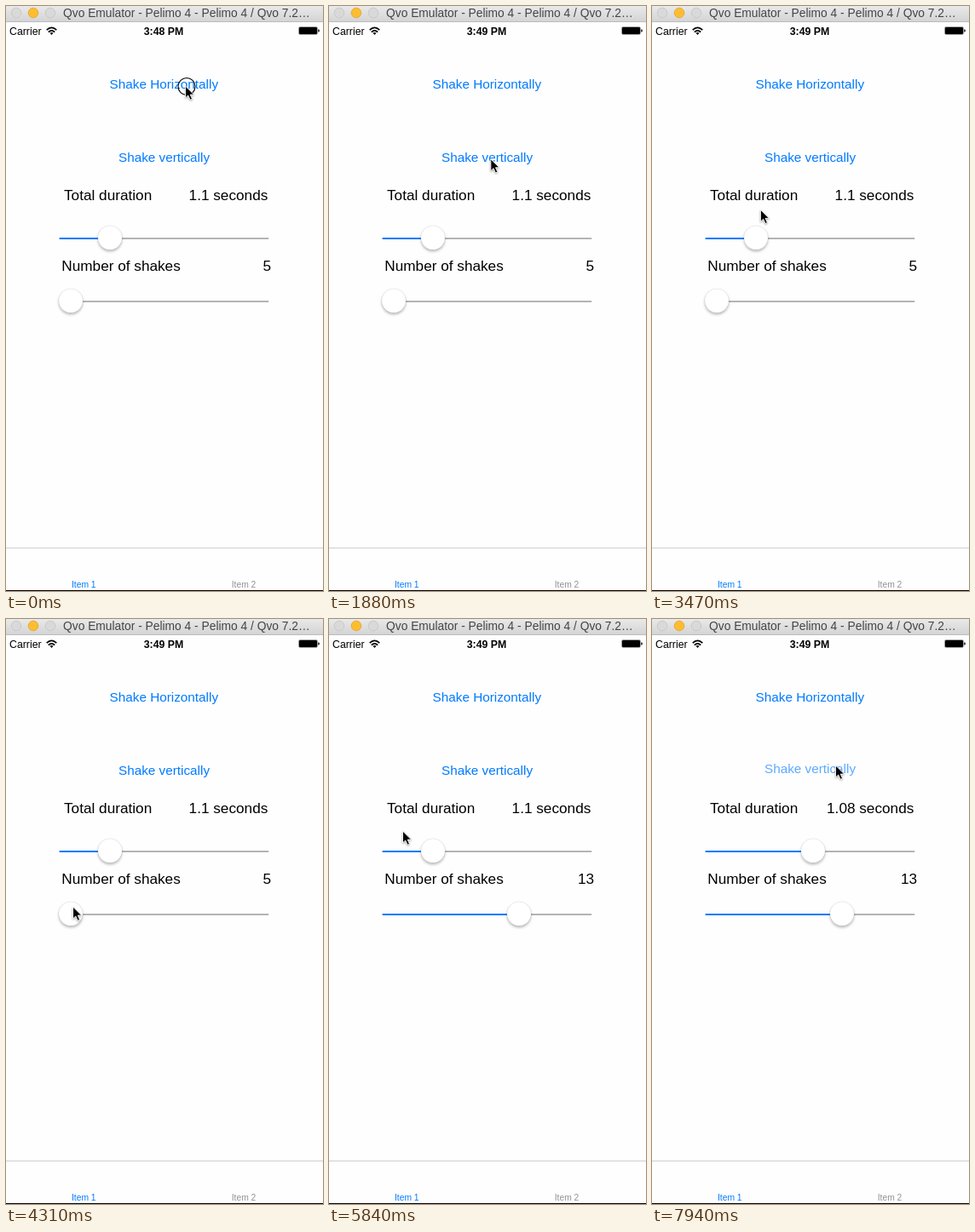
Animation, 372 px wide and 687 px high, one loop 8000 ms. Source, as an HTML page:

```html
<!DOCTYPE html>
<html lang="en">
<head>
<meta charset="utf-8">
<title>Shake demo</title>
<style>
  html, body { margin: 0; width: 100%; height: 100%; overflow: hidden; background: #fefefe; }
  svg { display: block; width: 372px; height: 687px; }
  text { font-family: "Liberation Sans", Arial, sans-serif; white-space: pre; }
  .button { font-size: 15.3px; fill: #007aff; text-anchor: middle; }
  .label { font-size: 17.2px; }
  .status { font-size: 12.3px; }
  .tab { font-size: 10.3px; text-anchor: middle; }
  .end { text-anchor: end; }
  .thumb { fill: #fff; stroke: #000; stroke-opacity: .13; stroke-width: .6;
    filter: drop-shadow(0 2.5px 1.6px rgba(0, 0, 0, .27)); }
  #arrow { filter: drop-shadow(0 1px 1px rgba(0, 0, 0, .35)); }
</style>
</head>
<body>
<svg viewBox="0 0 372 687">
  <defs>
    <linearGradient id="bar" x2="0" y2="1">
      <stop stop-color="#e9e9e9"/><stop offset="1" stop-color="#d3d3d3"/>
    </linearGradient>
  </defs>

  <rect width="372" height="19" fill="url(#bar)"/>
  <rect y="18" width="372" height="1" fill="#bcbcbc"/>
  <g fill="#d9d9d9" stroke="#c4c4c4" stroke-width=".8">
    <circle cx="12" cy="8" r="5.8"/>
    <circle cx="32" cy="8" r="5.8" fill="#fdbd31" stroke="#e2a32c"/>
    <circle cx="52" cy="8" r="5.8"/>
  </g>
  <text x="67" y="13" font-size="13.8" fill="#454545">Qvo Emulator - Pelimo 4 - Pelimo 4 / Qvo 7.2…</text>

  <text class="status" x="4" y="34">Carrier</text>
  <g fill="none" stroke="#000" stroke-width="1.7">
    <path d="M47.7 28.2Q53.5 22.6 59.3 28.2M49.8 30.6Q53.5 27 57.2 30.6"/>
    <path d="M51.5 31.8Q53.5 30.2 55.5 31.8L53.5 34Z" fill="#000" stroke="none"/>
  </g>
  <text id="clock" class="status" x="185" y="34" font-weight="bold" text-anchor="middle"></text>
  <rect x="343.5" y="24.5" width="22" height="9" rx="1.6" fill="none" stroke="#000" stroke-opacity=".6" stroke-width=".6"/>
  <rect x="344" y="25" width="21" height="8" rx="1"/>
  <path d="M366.3 27.2q1.6 .2 1.6 1.8t-1.6 1.8z"/>

  <text id="across" class="button" x="185.3" y="97.2">Shake Horizontally</text>
  <text id="down" class="button" x="185.5" y="183.2">Shake vertically</text>

  <text class="label" x="68" y="228.4">Total duration</text>
  <text id="seconds" class="label end" x="307.3" y="228.4"></text>
  <text class="label" x="65.3" y="311.4">Number of shakes</text>
  <text id="count" class="label end" x="311" y="311.4"></text>

  <g id="sliders"></g>

  <rect y="636" width="372" height="1" fill="#cfcfcf"/>
  <text class="tab" x="91.3" y="682.6" fill="#007aff">Item 1</text>
  <text class="tab" x="279" y="682.6" fill="#929292">Item 2</text>
  <rect y="686" width="372" height="1"/>

  <g id="pointer">
    <circle id="touch" cx="2" cy="0.5" r="10" fill="none" stroke="#000" stroke-width="1.1"/>
    <path id="arrow" d="M.5 0V14L3.7 11L6.1 16.3L8.5 15.2L6.2 10.1H10.6Z"
      stroke="#fff" stroke-width=".9"/>
  </g>
</svg>
<script>
const LOOP = 8000;
const $ = id => document.getElementById(id);
const clamp = (v, low, high) => Math.min(high, Math.max(low, v));

// Pointer trips; it rests where the last one ended.
const trips = [
  { from: 0, to: 60, x: 211, y: 92 },
  { from: 1400, to: 1580, x: 185, y: 184 },
  { from: 1790, to: 2000, x: 195, y: 174 },
  { from: 3260, to: 3470, x: 127, y: 239 },
  { from: 3470, to: 3920, x: 78, y: 338 },
  { from: 4310, to: 4400, x: 84, y: 336 },
  { from: 4480, to: 5400, x: 231, y: 336 },
  { from: 5560, to: 5840, x: 86, y: 249 },
  { from: 5990, to: 6140, x: 123, y: 269 },
  { from: 6200, to: 7120, x: 190, y: 269 },
  { from: 7330, to: 7500, x: 215, y: 172 },
];

// Holds on a button start a shake on release; holds on a slider drag its thumb.
const firstHold = { press: 0, release: 60 };
const acrossTap = { press: 800, release: 860, legs: 5, leg: 100 };
const downTap = { press: 2260, release: 2370, legs: 5, leg: 100 };
const countDrag = { press: 4440, release: 5520, grip: 8 };
const durationDrag = { press: 6160, release: 7190, grip: 1 };
const lastTap = { press: 7770, release: 7860, legs: 13, leg: 40 };
const holds = [firstHold, acrossTap, downTap, countDrag, durationDrag, lastTap];

function pointerAt(t) {
  let x = 210, y = 94;
  for (const trip of trips) {
    const p = clamp((t - trip.from) / (trip.to - trip.from), 0, 1);
    x += (trip.x - x) * p;
    y += (trip.y - y) * p;
  }
  return { x, y };
}

const thumbAt = (t, drag) => pointerAt(clamp(t, drag.press, drag.release)).x - drag.grip;

// Alternates between +2 and -2, one eased leg at a time, and ends at rest.
function shake(t, { release, legs, leg }) {
  const n = Math.floor((t - release) / leg);
  if (n < 0 || n >= legs) return 0;
  const stop = k => k === 0 || k === legs ? 0 : k % 2 ? 2 : -2;
  const p = (t - release) / leg - n;
  return stop(n) + (stop(n + 1) - stop(n)) * p * p * (3 - 2 * p);
}

// A button dims while held and brightens again after release.
const fade = (t, { press, release }) =>
  t < press ? 1 : clamp(.2 + .8 * (t - release) / 150, .2, 1);

function makeSlider(y) {
  const add = (name, attrs) => {
    const el = document.createElementNS("http://www.w3.org/2000/svg", name);
    for (const key in attrs) el.setAttribute(key, attrs[key]);
    return $("sliders").appendChild(el);
  };
  const track = { x: 62.5, y, width: 246, height: 2, rx: 1 };
  add("rect", { ...track, fill: "#b4b4b4" });
  const done = add("rect", { ...track, fill: "#007aff" });
  const thumb = add("circle", { class: "thumb", cy: y + .1, r: 14.2 });
  return x => {
    done.setAttribute("width", x - track.x);
    thumb.setAttribute("cx", x);
  };
}
const setDuration = makeSlider(272);
const setCount = makeSlider(346);

function setButton(id, t, tap, dx, dy) {
  const d = shake(t, tap);
  $(id).setAttribute("transform", `translate(${dx * d} ${dy * d})`);
  $(id).setAttribute("opacity", fade(t, tap));
}

function draw(t) {
  const { x, y } = pointerAt(t);
  $("pointer").setAttribute("transform", `translate(${x} ${y})`);
  const held = holds.some(h => t >= h.press && t < h.release);
  $("touch").style.display = held ? "" : "none";

  const duration = thumbAt(t, durationDrag), count = thumbAt(t, countDrag);
  setDuration(duration);
  setCount(count);
  // Both labels show their defaults until the slider first moves.
  const seconds = duration === 122 ? 1.1 : +((duration - 76) * .00957).toFixed(2);
  $("seconds").textContent = seconds + " seconds";
  $("count").textContent = count === 76 ? 5 : Math.floor((count - 76) / 219 * 20);
  $("clock").textContent = t < acrossTap.press ? "3:48 PM" : "3:49 PM";

  setButton("across", t, acrossTap, 1, 0);
  setButton("down", t, t < lastTap.press ? downTap : lastTap, 0, 1);
}

const begin = performance.now();
function tick() {
  draw((performance.now() - begin) % LOOP);
  requestAnimationFrame(tick);
}
tick();
</script>
</body>
</html>
```
